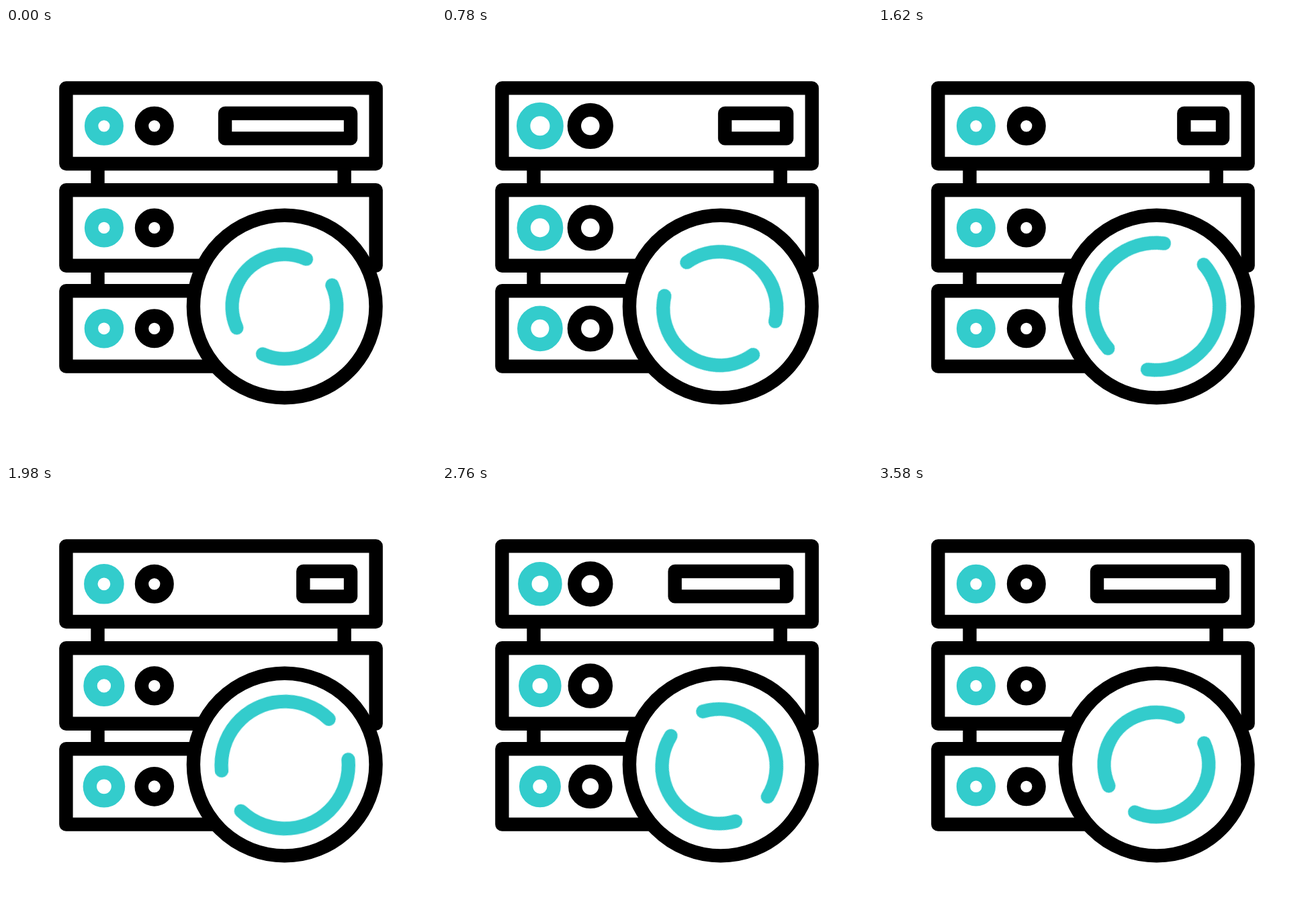
These frames come from a looping animation (640 px wide and 640 px high, 3600 ms). An HTML page:

```html
<!DOCTYPE html>
<html lang="en">
<head>
<meta charset="utf-8">
<title>Server refresh</title>
<style>
  html, body { margin: 0; width: 100%; height: 100%; overflow: hidden; background: #fff; }
  svg { display: block; width: 100vw; height: 100vh; }

  .ink { fill: none; stroke: #000; stroke-width: 20.4; stroke-linejoin: round; }
  .teal { stroke: #33cccc; --peak: 25px; }
  .black { --peak: 24px; }
  .disc { fill: #fff; }

  .led { r: 18.8px; animation: pulse 3600ms ease-in-out var(--delay) infinite; }
  .bar { animation: shrink 3600ms infinite; }

  /* The arcs turn once per loop while their centre circles twice. */
  .orbit { transform-origin: 413.7px 416px; animation: orbit 3600ms linear infinite; }
  .arcs {
    transform-origin: 414.4px 414.56px;
    stroke-linecap: round;
    stroke-dasharray: 138.7 41.3;
    animation: spin 3600ms linear infinite, grow 3600ms ease-in-out infinite;
  }

  @keyframes pulse {
    0%, 36.667%, 49.722%, 86.389%, 100% { r: 18.8px; }
    18.333%, 68.056% { r: var(--peak); }
  }
  @keyframes shrink {
    0%, 99.444%, 100% { x: 326px; width: 187px; }
    49.722% { x: 456px; width: 57px; }
    0%, 49.722% { animation-timing-function: cubic-bezier(.18, .16, .49, 1); }
  }
  @keyframes orbit {
    0% { transform: rotate(0deg); }
    99.444%, 100% { transform: rotate(720deg); }
  }
  @keyframes spin {
    0% { transform: rotate(-24.2deg); }
    99.444%, 100% { transform: rotate(-384.2deg); }
  }
  @keyframes grow {
    0%, 99.444%, 100% { r: 77.8px; }
    49.722% { r: 95px; }
  }
</style>
</head>
<body>
<svg viewBox="0 0 640 640">
  <g class="ink">
    <path d="M136.5 202V241M503.6 202V241M136.5 354V391"/>
    <rect x="89.4" y="89.4" width="461.2" height="112.6"/>
    <rect x="89.4" y="241.2" width="461.2" height="112.6"/>
    <path d="M285 391.2H89.4V503.6H310"/>
    <rect class="bar" x="326" y="127" width="187" height="37.4"/>
  </g>

  <g class="ink">
    <circle class="led teal" cx="145.9" cy="145.8" style="--delay: 25ms"/>
    <circle class="led teal" cx="145.9" cy="297.4" style="--delay: -40ms"/>
    <circle class="led teal" cx="145.9" cy="447.3" style="--delay: -90ms"/>
    <circle class="led black" cx="220.8" cy="145.8" style="--delay: 160ms"/>
    <circle class="led black" cx="220.8" cy="297.4" style="--delay: 115ms"/>
    <circle class="led black" cx="220.8" cy="447.3" style="--delay: 70ms"/>
  </g>

  <circle class="ink disc" cx="414.7" cy="414.6" r="135.8"/>
  <g class="orbit">
    <circle class="ink teal arcs" cx="414.4" cy="414.56" r="77.8" pathLength="360"/>
  </g>
</svg>
</body>
</html>
```
